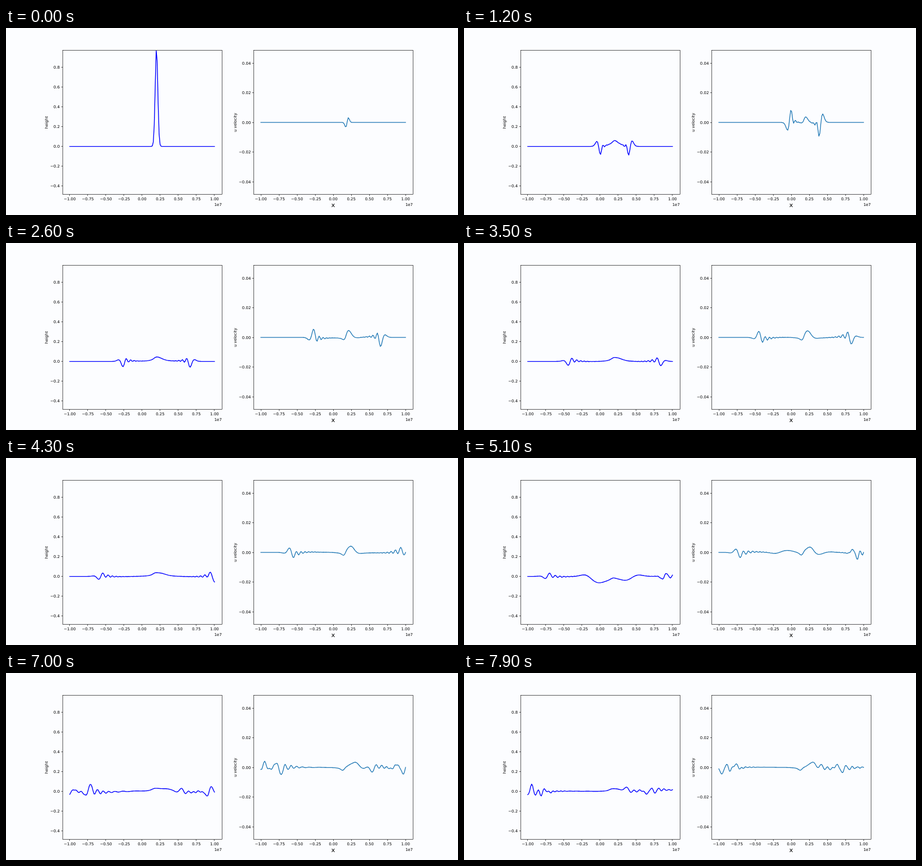
Recreate the animation shown at these times as an HTML page with a canvas. Size 800 px wide and 331 px high, loop 8000 ms.

```html
<!DOCTYPE html>
<html>
<head>
<meta charset="utf-8">
<style>
  html, body { margin: 0; width: 100%; height: 100%; overflow: hidden; background: #fcfdff; }
  canvas { display: block; }
</style>
</head>
<body>
<canvas id="stage" width="800" height="331"></canvas>
<script>
const ctx = document.getElementById('stage').getContext('2d');

// Rotating linear shallow water on a closed basin, started from a Gaussian bump.
const FRAMES = 80, STEPS = 20;
const NX = 150, NY = 95, MID = 47;
const DX = 2e7 / (NX - 1), DY = 9.55e6 / NY;
const G = 9.81, DEPTH = 1000, DT = 100, F = 1e-4;
const BUMP_X = 1.987e6, BUMP_R = 2.5e5;

const gridX = i => -1e7 + i * DX;

function simulate() {
  const size = NX * NY;
  const eta = new Float64Array(size), u = new Float64Array(size), v = new Float64Array(size);
  for (let i = 0; i < NX; i++)
    for (let j = 0; j < NY; j++) {
      const dx = gridX(i) - BUMP_X, dy = (j - MID) * DY;
      eta[i * NY + j] = Math.exp(-(dx * dx + dy * dy) / BUMP_R ** 2);
    }

  const alpha = DT * F, beta = alpha * alpha / 4;
  function step() {
    for (let i = 0, n = 0; i < NX; i++)
      for (let j = 0; j < NY; j++, n++) {
        const u0 = u[n], v0 = v[n];
        const px = i < NX - 1 ? G * DT / DX * (eta[n + NY] - eta[n]) : 0;
        const py = j < NY - 1 ? G * DT / DY * (eta[n + 1] - eta[n]) : 0;
        u[n] = i < NX - 1 ? (u0 - px - beta * u0 + alpha * v0) / (1 + beta) : 0;
        v[n] = j < NY - 1 ? (v0 - py - beta * v0 - alpha * u0) / (1 + beta) : 0;
      }
    for (let i = 0, n = 0; i < NX; i++)
      for (let j = 0; j < NY; j++, n++) {
        const west = i ? u[n - NY] : 0, south = j ? v[n - 1] : 0;
        eta[n] -= DEPTH * DT * ((u[n] - west) / DX + (v[n] - south) / DY);
      }
  }

  const slice = field => Array.from({ length: NX }, (_, i) => field[i * NY + MID]);
  const frames = [];
  step();
  for (let k = 0; k < FRAMES; k++) {
    frames.push({ height: slice(eta), velocity: slice(u) });
    for (let s = 0; s < STEPS; s++) step();
  }
  return frames;
}

const TOP = 39.7, BOTTOM = 294.6, WIDTH = 281.8;
const X_SCALE = WIDTH / 1.1 / 2e7;
const plots = [
  { key: 'height', label: 'height', labelX: 73.8, left: 100, zero: 209.6, scale: 175.2,
    ticks: [-0.4, -0.2, 0, 0.2, 0.4, 0.6, 0.8], digits: 1, color: '#0000ff', line: 1.39 },
  { key: 'velocity', label: 'u velocity', labelX: 407.6, left: 438.2, zero: 167.1, scale: 2627,
    ticks: [-0.04, -0.02, 0, 0.02, 0.04], digits: 2, color: '#1f77b4', line: 1.3 }
];

const snap = p => Math.floor(p) + 0.5;
const format = (value, digits) => value.toFixed(digits).replace('-', '\u2212');

function text(str, x, y, align, size = 6.94) {
  ctx.font = `${size}px "DejaVu Sans", sans-serif`;
  ctx.textAlign = align;
  ctx.fillText(str, x, y);
}

function segment(x1, y1, x2, y2) {
  ctx.beginPath();
  ctx.moveTo(x1, y1);
  ctx.lineTo(x2, y2);
  ctx.stroke();
}

function drawPlot(plot, values) {
  const { left, zero, scale } = plot;
  const right = left + WIDTH, center = left + WIDTH / 2;

  ctx.save();
  ctx.beginPath();
  ctx.rect(left, TOP, WIDTH, BOTTOM - TOP);
  ctx.clip();
  ctx.strokeStyle = plot.color;
  ctx.lineWidth = plot.line;
  ctx.lineJoin = 'round';
  ctx.lineCap = 'square';
  ctx.beginPath();
  values.forEach((value, i) => ctx.lineTo(center + gridX(i) * X_SCALE, zero - value * scale));
  ctx.stroke();
  ctx.restore();

  ctx.fillStyle = ctx.strokeStyle = '#000';
  ctx.lineWidth = 0.65;
  const l = snap(left), b = snap(BOTTOM - 0.3), t = snap(TOP);
  ctx.strokeRect(l, t, snap(right + 0.3) - l, b - t);
  for (let k = -4; k <= 4; k++) {
    const x = center + k * 2.5e6 * X_SCALE;
    segment(snap(x), b, snap(x), b + 2.7);
    text(format(k / 4, 2), x, 304.7, 'center');
  }
  for (const value of plot.ticks) {
    const y = zero - value * scale;
    segment(l, snap(y), l - 2.7, snap(y));
    text(format(value, plot.digits), left - 4.9, y + 2.6, 'right');
  }
  text('1e7', right, 314.5, 'right');

  ctx.save();
  ctx.translate(plot.labelX, 167.2);
  ctx.rotate(-Math.PI / 2);
  text(plot.label, 0, 0, 'center');
  ctx.restore();
}

const frames = simulate();

function draw() {
  const frame = frames[Math.floor(performance.now() / 100) % FRAMES];
  ctx.fillStyle = '#fcfdff';
  ctx.fillRect(0, 0, 800, 331);
  for (const plot of plots) drawPlot(plot, frame[plot.key]);
  text('x', 579.1, 317.4, 'center', 11.1);
  requestAnimationFrame(draw);
}
draw();
</script>
</body>
</html>
```
